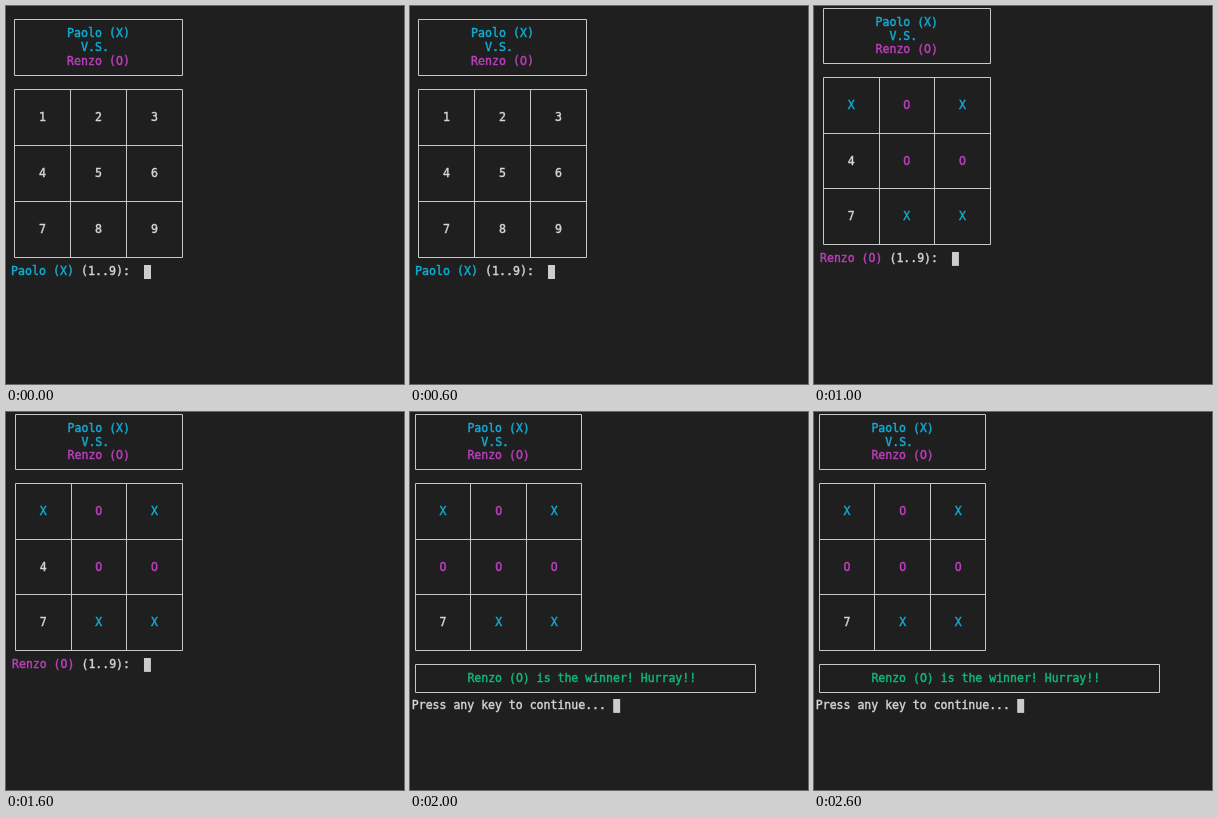
An HTML page that plays this animation: 398 by 378 pixels, repeating every 3 s.

```html
<!DOCTYPE html>
<html lang="en">
<head>
<meta charset="utf-8">
<title>Tic-tac-toe terminal</title>
<style>
  html, body { margin: 0; height: 100%; overflow: hidden; background: #1f1f1f; }
  svg { display: block; }
  text { font-family: "DejaVu Sans Mono", monospace; white-space: pre; stroke-width: .4; }
  path { fill: none; stroke: #c8c8c8; }
</style>
</head>
<body>
<svg id="stage" width="398" height="378"></svg>
<script>
const CYAN = '#10afd6', PINK = '#bc3fbc', GREEN = '#0dbc79', WHITE = '#d6d6d6';
const X = 'Paolo (X)', O = 'Renzo (O)';
const colorOf = { X: CYAN, O: PINK };

// left, top: centre of the upper left corner; scale: size of the 7 by 14 character cell
const screens = [
  { left: 8.5, top: 13.5, scale: 1, cells: '123456789', turn: 'X' },
  { left: 9.5, top: 2.3, scale: .992, cells: 'XOX4OO7XX', turn: 'O' },
  { left: 5.3, top: 2.3, scale: .992, cells: 'XOXOOO7XX' }
];

function draw({ left, top, scale, cells, turn }) {
  const cw = 7 * scale, rh = 14 * scale;
  const x = col => left + cw * col;
  const y = row => top + rh * row;
  const snap = v => Math.floor(v) + .5;
  let out = '';

  const text = (col, row, str, color = WHITE) => {
    out += `<text x="${x(col - .5)}" y="${y(row) + 3.5}" font-size="${cw / .602}" ` +
      `fill="${color}" stroke="${color}">${str}</text>`;
  };
  const line = (c1, r1, c2, r2) => {
    out += `<path d="M${snap(x(c1))} ${snap(y(r1))}L${snap(x(c2))} ${snap(y(r2))}"/>`;
  };
  const grid = (cols, rows) => {
    for (const r of rows) line(cols[0], r, cols.at(-1), r);
    for (const c of cols) line(c, rows[0], c, rows.at(-1));
  };
  const cursor = (col, row) => {
    out += `<rect x="${x(col - .5)}" y="${Math.ceil(y(row) - 7)}" ` +
      `width="${cw}" height="${rh}" fill="#ccc"/>`;
  };

  grid([0, 24], [0, 4]);
  text(8, 1, X, CYAN);
  text(10, 2, 'V.S.', CYAN);
  text(8, 3, O, PINK);

  grid([0, 8, 16, 24], [5, 9, 13, 17]);
  [...cells].forEach((mark, i) =>
    text(4 + i % 3 * 8, 7 + Math.floor(i / 3) * 4, mark, colorOf[mark]));

  if (turn) {
    text(0, 18, turn === 'X' ? X : O, colorOf[turn]);
    text(10, 18, '(1..9):');
    cursor(19, 18);
  } else {
    grid([0, 49], [18, 20]);
    text(8, 19, O + ' is the winner! Hurray!!', GREEN);
    text(0, 21, 'Press any key to continue...');
    cursor(29, 21);
  }
  return `<g>${out}</g>`;
}

const stage = document.getElementById('stage');
stage.innerHTML = screens.map(draw).join('');

function tick() {
  const current = Math.floor(performance.now() / 1000) % screens.length;
  [...stage.children].forEach((g, i) => g.style.display = i === current ? '' : 'none');
  requestAnimationFrame(tick);
}
tick();
</script>
</body>
</html>
```
